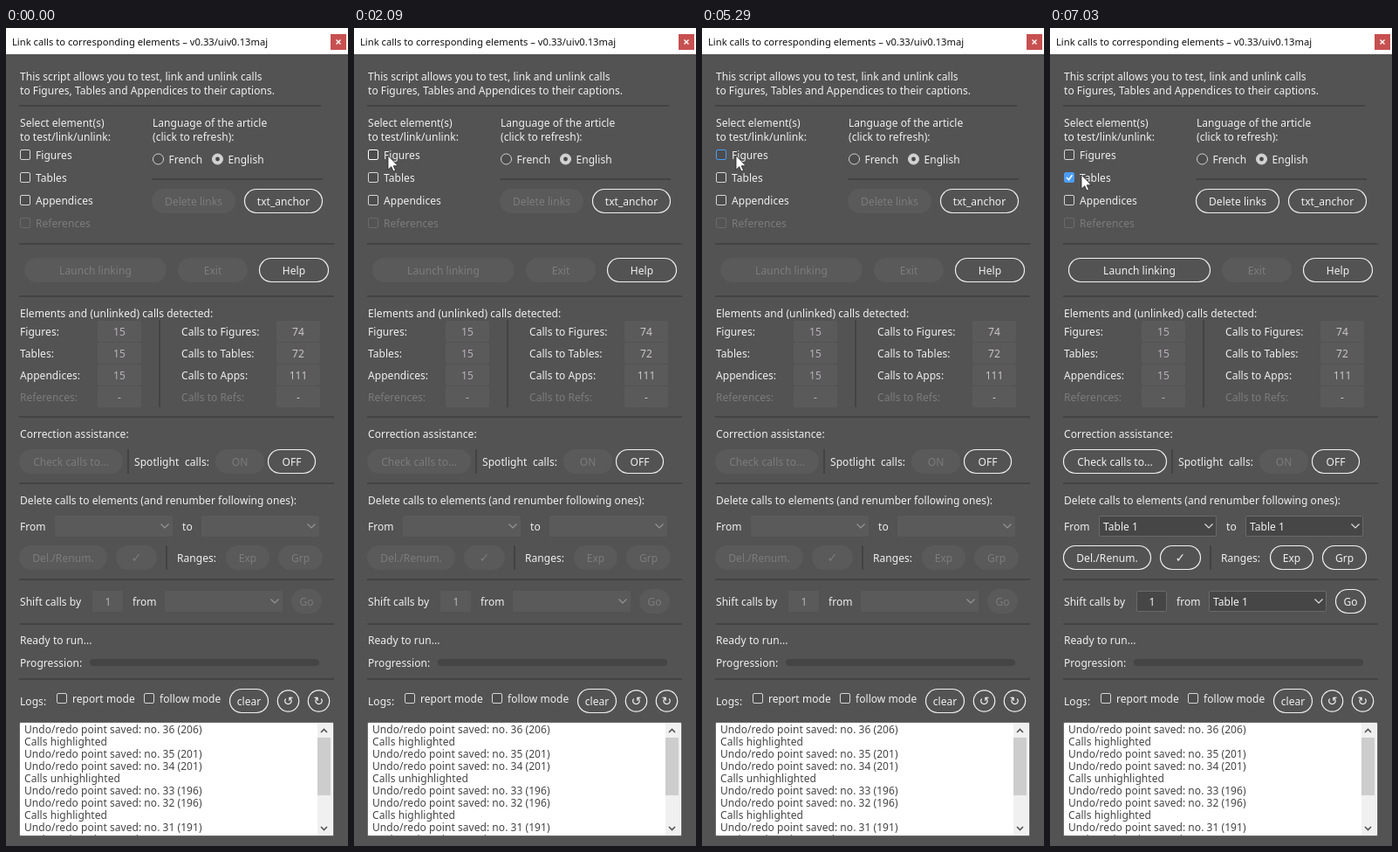
Animation of 392x936 px, one loop 8 s. Source, as an HTML page:

```html
<!DOCTYPE html>
<html lang="en">
<head>
<meta charset="utf-8">
<title>Link calls</title>
<style>
  html, body { margin: 0; width: 100%; height: 100%; overflow: hidden; background: #535353; }
  svg { display: block; width: 392px; height: 936px; }
  text { font: 12px "Noto Sans", "Open Sans", sans-serif; letter-spacing: .05px; white-space: pre; }
  .title { font-size: 11.2px; letter-spacing: 0; }
  .symbol { font-family: "DejaVu Sans", sans-serif; font-size: 14px; }
</style>
</head>
<body>
<svg id="stage" viewBox="0 0 392 936"></svg>
<script>
const LOOP = 8000;
const INK = '#f0f0f0', DIM = '#7c7c7c', PANEL = '#5a5a5a', LINE = '#434343', BLUE = '#4b9cf5';

// [time, x, y] of the pointer tip; it jumps from one place to the next
const POINTER = [
  [710, 172, 54], [830, 151, 82], [950, 131, 106], [1100, 110, 115], [1220, 91, 118],
  [1370, 65, 126], [1490, 46, 137], [1640, 34, 150], [1940, 37, 147], [2090, 39, 146],
  [6130, 39, 149], [6250, 39, 156], [6370, 38, 162], [6520, 37, 165], [6640, 36, 167], [6760, 36, 168]
];
const LOG = [
  'Undo/redo point saved: no. 36 (206)', 'Calls highlighted',
  'Undo/redo point saved: no. 35 (201)', 'Undo/redo point saved: no. 34 (201)', 'Calls unhighlighted',
  'Undo/redo point saved: no. 33 (196)', 'Undo/redo point saved: no. 32 (196)', 'Calls highlighted',
  'Undo/redo point saved: no. 31 (191)', 'Undo/redo point saved: no. 30 (191)'
];

// Text is placed by the vertical middle of its line
const text = (x, y, s, fill = INK, extra = '') =>
  `<text x="${x}" y="${y + 4.5}" fill="${fill}" ${extra}>${s}</text>`;
const centred = (x, y, s, fill, extra = '') => text(x, y, s, fill, `text-anchor="middle" ${extra}`);
const rect = (x, y, w, h, fill, extra = '') =>
  `<rect x="${x}" y="${y}" width="${w}" height="${h}" fill="${fill}" ${extra}/>`;
const stroke = (d, color, width = 1) => `<path d="${d}" fill="none" stroke="${color}" stroke-width="${width}"/>`;
const rule = (y, x1 = 15, x2 = 376) => rect(x1, y - 1, x2 - x1, 2, LINE);
const bar = (x, y1, y2) => rect(x - 1, y1, 2, y2 - y1, LINE);

function button(x1, x2, y, label, on = true, extra = '') {
  const shape = on
    ? rect(x1 + .5, y - 13.5, x2 - x1 - 1, 27, 'none', `rx="13.5" stroke="${INK}" stroke-width="1.2"`)
    : rect(x1, y - 14, x2 - x1, 28, PANEL, 'rx="14"');
  return shape + centred((x1 + x2) / 2, y, label, on ? INK : DIM, extra);
}

function checkbox(x, y, label, { checked = false, focus = false, hover = false, off = false } = {}) {
  const edge = checked || focus ? BLUE : off ? '#6b6b6b' : hover ? '#fff' : '#d6d6d6';
  return rect(x + .5, y - 5.5, 11, 11, checked ? BLUE : off ? 'none' : '#4c4c4c', `rx="1.5" stroke="${edge}"`) +
    (checked ? stroke(`M${x + 3} ${y}l2.5 2.7 4-5.4`, '#fff', 1.6) : '') +
    text(x + 18, y, label, off ? DIM : INK);
}

function radio(x, y, label, on) {
  return `<circle cx="${x}" cy="${y}" r="6" fill="${on ? '#d2d2d2' : '#4c4c4c'}" stroke="#d2d2d2"/>` +
    (on ? `<circle cx="${x}" cy="${y}" r="2.4" fill="#484848"/>` : '') + text(x + 12, y, label);
}

const field = (x, y, w, on) => on
  ? rect(x + .5, y - 11.5, w - 1, 23, '#464646', 'rx="1.5" stroke="#696969"')
  : rect(x, y - 12, w, 24, PANEL, 'rx="2"');

function dropdown(x, y, value) {
  return field(x, y, 135, !!value) + (value ? text(x + 5, y, value) : '') +
    stroke(`M${x + 121.5} ${y - 2.5}l4.5 4.5 4.5-4.5`, value ? '#dcdcdc' : '#959595', 1.2);
}

function counter(x, y, value, color) {
  return rect(x, y - 12, 50, 24, PANEL, 'rx="2"') + centred(x + 25, y, value, color);
}

function counts() {
  const rows = [['Figures', 'Figures', 15, 74], ['Tables', 'Tables', 15, 72],
    ['Appendices', 'Apps', 15, 111], ['References', 'Refs', '-', '-']];
  return rows.map(([left, right, found, calls], i) => {
    const y = 347 + 25 * i, color = i === 3 ? DIM : INK;
    return text(16, y, left + ':', color) + counter(105, y, found, '#b9b0ba') +
      text(201, y, `Calls to ${right}:`, color) + counter(310, y, calls, '#c9c4c6');
  }).join('');
}

function logPanel() {
  return `<clipPath id="logClip"><rect x="16" y="795" width="341" height="129"/></clipPath>` +
    rect(15.5, 794.5, 360, 130, '#fff', 'rx="1.5" stroke="#6a6a6a"') +
    `<g clip-path="url(#logClip)">` +
    LOG.map((s, i) => text(21, 802.5 + 14 * i, s, '#454545', 'letter-spacing=".1"')).join('') + '</g>' +
    rect(357, 795, 17, 129, '#f0f0f0') + rect(357, 812, 15, 66, '#cdcdcd') +
    stroke('M361 806l3.5-3.5 3.5 3.5M361 914l3.5 3.5 3.5-3.5', '#555', 1.6);
}

function pointer([, x, y]) {
  return `<path transform="translate(${x} ${y})" d="M0 0V16.2L3.7 12.7 6.1 18 8.6 16.9 6.2 11.8H11.3Z"
    fill="#fff" stroke="#222" stroke-width=".8"/>`;
}

function draw({ first, on, item, figures, tables, tip }) {
  return rect(0, 0, 392, 936, '#535353') + rect(0, 0, 392, 30, '#fff') +
    text(7, 15, 'Link calls to corresponding elements – v0.33/uiv0.13maj', '#111', 'class="title"') +
    rect(372, 7, 18, 18, '#c75050') + stroke('M378.5 13.5l5 5m0-5l-5 5', '#fff', 1.4) +
    text(16, 55, 'This script allows you to test, link and unlink calls') +
    text(16, 71, 'to Figures, Tables and Appendices to their captions.') +
    rule(89, 15, 361) +

    text(16, 108, 'Select element(s)') + text(16, 124, 'to test/link/unlink:') +
    checkbox(16, 145, 'Figures', figures) + checkbox(16, 171, 'Tables', tables) +
    checkbox(16, 197, 'Appendices') + checkbox(16, 223, 'References', { off: true }) +
    text(168, 108, 'Language of the article') + text(168, 124, '(click to refresh):') +
    radio(174.5, 150, 'French', false) + radio(242.5, 150, 'English', true) +
    rule(173, 167, 363) +
    button(167, 263, 198, 'Delete links', first) + button(273, 363, 198, 'txt_anchor') +
    rule(247) +
    button(21, 184, 277, 'Launch linking', first) + button(197, 277, 277, 'Exit', false) +
    button(290, 370, 277, 'Help') + rule(307) +

    text(16, 326, 'Elements and (unlinked) calls detected:') + counts() + bar(176, 334, 434) + rule(445) +

    text(16, 464, 'Correction assistance:') + button(15, 134, 496, 'Check calls to...', first) +
    bar(140, 482, 510) + text(147, 496, 'Spotlight') + text(205, 496, 'calls:') +
    button(240, 296, 496, 'ON', false) + button(300, 355, 496, 'OFF') + rule(521) +

    text(16, 540, 'Delete calls to elements (and renumber following ones):') +
    text(16, 570, 'From') + dropdown(56, 570, first && item) +
    text(202, 570, 'to') + dropdown(224, 570, on && item) +
    button(15, 116, 606, 'Del./Renum.', on) + button(126, 173, 606, '✓', on, 'class="symbol"') +
    bar(184, 592, 620) + text(196, 606, 'Ranges:') +
    button(252, 302, 606, 'Exp', on) + button(312, 363, 606, 'Grp', on) + rule(631) +

    text(16, 656, 'Shift calls by') + field(99, 656, 35, on) + centred(117, 656, '1', on ? INK : '#b9b0ba') +
    text(145, 656, 'from') + dropdown(182, 656, on && item) + button(327, 362, 656, 'Go', on) + rule(682) +

    text(16, 700, 'Ready to run...') + text(16, 726, 'Progression:', INK, 'letter-spacing=".3"') +
    rect(96, 722, 263, 8, '#454545', 'rx="4"') + rule(745) +

    text(16, 770, 'Logs:') + checkbox(58, 767, 'report mode') + checkbox(158, 767, 'follow mode') +
    button(256, 301, 770, 'clear') +
    [['↺', 323.5], ['↻', 358.5]].map(([s, x]) =>
      `<circle cx="${x}" cy="770" r="12.2" fill="none" stroke="${INK}" stroke-width="1.2"/>` +
      centred(x, 770, s, INK, 'class="symbol"')).join('') +
    logPanel() + (tip ? pointer(tip) : '');
}

function stateAt(t) {
  const figuresOn = t >= 3300 && t < 5290, tablesOn = t >= 7030;
  return {
    first: figuresOn || tablesOn,
    on: (t >= 3450 && t < 5290) || tablesOn,
    item: tablesOn ? 'Table 1' : 'Fig. 1',
    figures: { checked: figuresOn, focus: t >= 3180 && t < 6910, hover: t >= 1640 && t < 6520 },
    tables: { checked: tablesOn, focus: t >= 6910, hover: t >= 6520 },
    tip: POINTER.filter(p => p[0] <= t).pop()
  };
}

const stage = document.getElementById('stage');
const start = performance.now();
let shown = '';
function tick() {
  const state = stateAt((performance.now() - start) % LOOP);
  const key = JSON.stringify(state);
  if (key !== shown) {
    stage.innerHTML = draw(state);
    shown = key;
  }
  requestAnimationFrame(tick);
}
tick();
</script>
</body>
</html>
```
